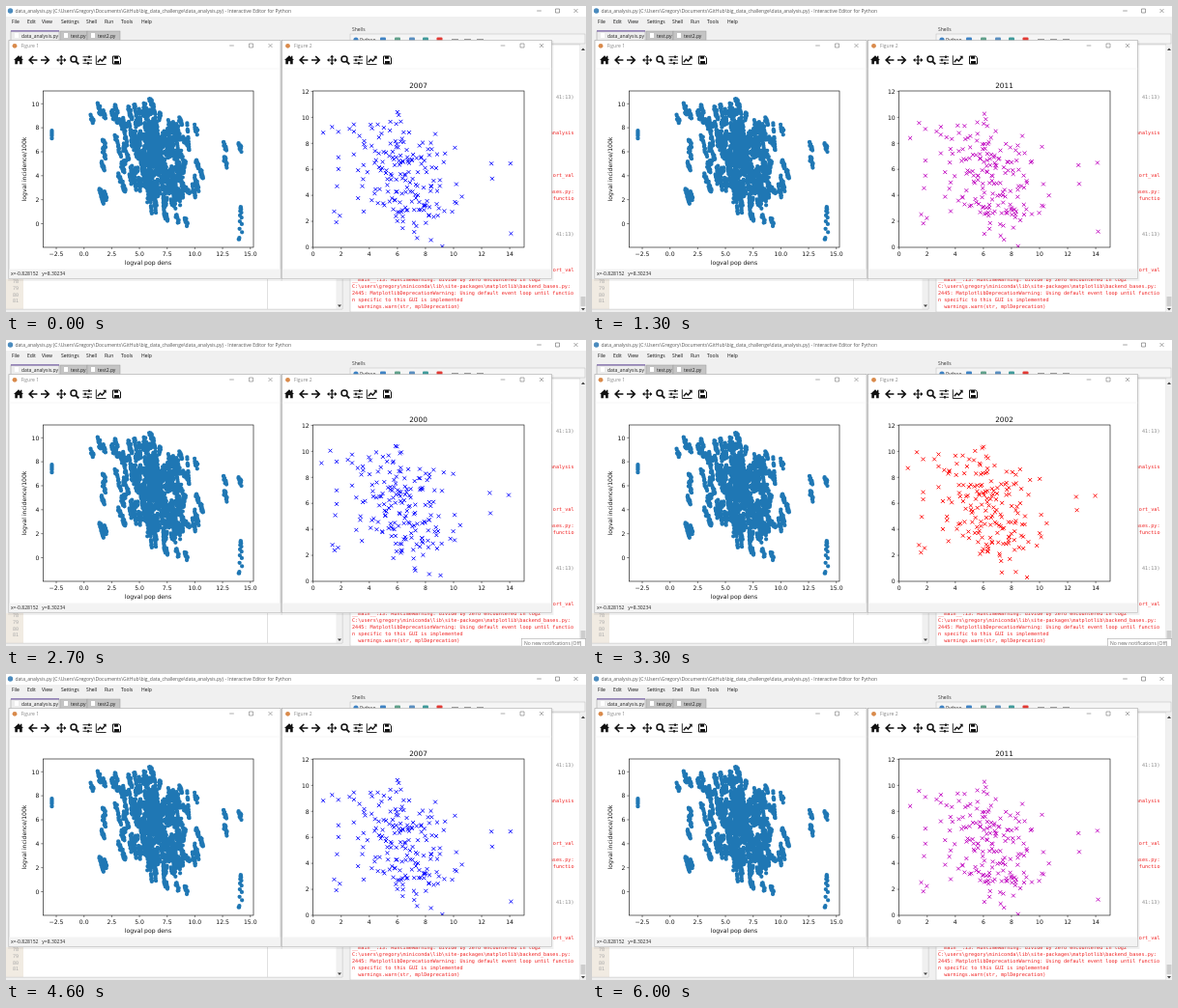
Animation of 600x317 px, one loop 6.1 s. Source, as an HTML page:

```html
<!DOCTYPE html>
<html lang="en">
<head>
<meta charset="utf-8">
<title>Yearly scatter</title>
<style>
  html, body { margin: 0; width: 100%; height: 100%; overflow: hidden; background: #f0f0f0; }
  svg { display: block; width: 600px; height: 317px; }
  text { white-space: pre; }
  .ui { font-family: "Open Sans", sans-serif; }
  .plot { font-family: "DejaVu Sans", sans-serif; }
  .mono { font-family: "DejaVu Sans Mono", monospace; }
</style>
</head>
<body>
<svg id="stage" viewBox="0 0 600 317" xmlns="http://www.w3.org/2000/svg"></svg>
<script>
const LOOP = 6100, YEAR_MS = 284, LEAD = 5, LAST_STEP = 20;
const FIRST_YEAR = 2000, YEARS = 16, START_YEAR = 7;
const COLORS = ['#0000ff', '#008000', '#ff0000', '#00bfbf', '#bf00bf', '#bfbf00', '#000000'];

// --- drawing helpers -------------------------------------------------
const rect = (x, y, w, h, fill, extra = '') =>
  `<rect x="${x}" y="${y}" width="${w}" height="${h}" fill="${fill}" ${extra}/>`;
const line = (d, stroke = '#000', width = 0.5, extra = '') =>
  `<path d="${d}" fill="none" stroke="${stroke}" stroke-width="${width}" ${extra}/>`;
const shape = (d, fill = '#111') => `<path d="${d}" fill="${fill}"/>`;
const text = (kind, x, y, str, size, fill = '#000', extra = '') =>
  `<text class="${kind}" x="${x}" y="${y}" font-size="${size}" fill="${fill}" ${extra}>${str}</text>`;
const END = 'text-anchor="end"', MID = 'text-anchor="middle"';
const range = (from, to, step) =>
  Array.from({ length: Math.round((to - from) / step) + 1 }, (_, i) => from + i * step);

// --- data: every country drifts a little each year -------------------
let seed = 20071;
function random() {
  seed = (seed + 0x6D2B79F5) | 0;
  let t = Math.imul(seed ^ (seed >>> 15), 1 | seed);
  t = (t + Math.imul(t ^ (t >>> 7), 61 | t)) ^ t;
  return ((t ^ (t >>> 14)) >>> 0) / 4294967296;
}
const normal = () => (random() + random() + random() + random() - 2) * 1.73;

const edge = [
  [.72, 8.75], [1.35, 9.6], [1.8, 9.2], [1.8, 6.8], [1.8, 5.9], [1.7, 4.8], [1.5, 2.6],
  [1.65, 2.1], [1.9, 2.4], [2.6, 9.1], [2.9, 9.5], [2.9, 8.8], [3.3, 8.4], [2.9, 7.1],
  [3.2, 6], [3.5, 4.6], [3.2, 3.8], [3.6, 3], [4.1, 9.5], [4.2, 9], [5.5, 9.8],
  [6, 10.3], [6.1, 10.1], [8.7, 8.6], [10.1, 7.8], [9.3, 6.7], [10.2, 5], [10.6, 4.1],
  [10.1, 3.5], [10.2, 3.1], [9.9, 2.7], [9.2, .2], [8.4, .5], [7.4, .6],
  [12.7, 6.5], [12.75, 5.2], [14.05, 6.45], [-2.9, 7.5]
];

function makeCountry(x, y, calm) {
  const drift = calm ? -0.035 : -0.04 + 0.05 * normal();
  const growth = calm ? 0.018 : 0.005 + 0.025 * random();
  return Array.from({ length: YEARS }, (_, i) => {
    const dt = i - START_YEAR;
    return [x + (x < 0 ? 0 : growth * dt), Math.min(10.4, y + drift * dt + 0.14 * normal())];
  });
}

const countries = edge.map(([x, y]) => makeCountry(x, y, true));
while (countries.length < 195) {
  const x = 6.5 + 1.5 * normal();
  const y = 5.7 - 0.25 * (x - 6.5) + 2.3 * normal();
  const top = 9.6 - Math.max(0, x - 6.5) * 0.5;
  const bottom = Math.max(1, 4.6 - x * 0.5);
  if (x > 3.4 && x < 9.4 && y > bottom && y < top) countries.push(makeCountry(x, y, false));
}
countries.push(Array.from({ length: YEARS }, (_, i) =>
  [13.95 + 0.02 * i, Math.max(-1.3, 1.4 - 0.065 * (i - 9.3) ** 2)]));

// --- axes ------------------------------------------------------------
const left = {
  x: v => 80.7 + v * 11.47, y: v => 225.5 - v * 12.42, box: [38.3, 88, 217.7, 162],
  xTicks: range(-2.5, 15, 2.5), yTicks: range(0, 10, 2), label: v => v.toFixed(1)
};
const right = {
  x: v => 317.7 + v * 14.53, y: v => 250 - v * 13.47, box: [317.7, 88, 218.3, 162],
  xTicks: range(0, 14, 2), yTicks: range(0, 12, 2), label: v => v
};
function axes(a) {
  const [x, y, w, h] = a.box, base = y + h;
  return rect(x, y, w, h, 'none', 'stroke="#000" stroke-width=".6"') +
    a.xTicks.map(v => line(`M${a.x(v)} ${base}v2.1`) +
      text('plot', a.x(v), base + 8.6, String(a.label(v)).replace('-', '−'), 6.1, '#111', MID)).join('') +
    a.yTicks.map(v => line(`M${x} ${a.y(v)}h-2.1`) +
      text('plot', x - 4, a.y(v) + 2.3, v, 6.1, '#111', END)).join('');
}
const at = (a, [x, y]) => `M${a.x(x).toFixed(2)} ${a.y(y).toFixed(2)}`;
const dots = countries.flat().map(p => at(left, p) + 'h0').join('');
const crosses = range(0, YEARS - 1, 1).map(i => countries.map(c =>
  at(right, c[i]) + 'm-1.9 -1.9l3.8 3.8m0 -3.8l-3.8 3.8').join(''));

// --- windows ---------------------------------------------------------
const buttons = (x, y, gap, color) =>
  line(`M${x - 2.3} ${y}h4.6M${x + gap - 2} ${y - 2}h4v4h-4zM${x + 2 * gap - 2} ${y - 2}l4 4m0 -4l-4 4`, color, 0.6);

function toolbar(x) {
  const icons = [
    shape('M8 56l5 -4.7 2 1.9v-1.5h1.4v2.8l1.6 1.5h-1.3v4.2h-2.6v-3h-2.2v3h-2.6v-4.2z'),
    line('M32.4 56h-8M28.2 52l-4 4 4 4', '#111', 1.7),
    line('M36 56h8M40.2 52l4 4 -4 4', '#111', 1.7),
    line('M53 56h8.4M57.2 51.8v8.4', '#111', 1.2),
    shape('M57.2 50.8l2 2.4h-4zM57.2 61.2l2 -2.4h-4zM52 56l2.4 -2v4zM62.4 56l-2.4 -2v4z'),
    '<circle cx="70" cy="55" r="3" fill="none" stroke="#111" stroke-width="1.5"/>',
    line('M72.3 57.3l3 3', '#111', 1.9),
    line('M79.5 52.7h9.5M79.5 56h9.5M79.5 59.3h9.5', '#111', 0.9),
    line('M86 51.4v2.6M82 54.7v2.6M85 58v2.6', '#111', 1.7),
    line('M93.3 51.3v9.2h10.2', '#111', 0.9),
    line('M94.8 58.2l2.6 -3 2 1.8 3.4 -4', '#111', 1.4),
    shape('M100.3 51.8h3.3v3.3z'),
    line('M110.5 52h6.3l1.7 1.7v6.3h-8z', '#111', 1),
    shape('M112 52h4v2.8h-4zM112 57h5v3h-5z')
  ];
  return `<g transform="translate(${x} 0)">${icons.join('')}</g>`;
}

function figureWindow(x, w, name, iconShift) {
  return rect(x - 1, 36, w + 3, 249, '#000', 'opacity=".06"') +
    rect(x, 35.5, w, 247, '#fff', 'stroke="#a9a9a9" stroke-width=".6"') +
    line(`M${x} 65h${w}`, '#eee') +
    rect(x + .3, 272.5, w - .6, 9.7, '#f3f3f3') +
    `<circle cx="${x + 6}" cy="41.3" r="2.4" fill="#d98a4b"/>` +
    text('ui', x + 12.5, 43.2, name, 5, '#888') +
    buttons(x + w - 50.5, 41, 20, '#777') + toolbar(iconShift);
}

function editor() {
  const menus = [[6, 'File'], [22, 'Edit'], [37, 'View'], [57, 'Settings'], [83, 'Shell'],
    [102, 'Run'], [119, 'Tools'], [140, 'Help']];
  const tab = (x, w, label, fill) =>
    rect(x, 26, w, 12, fill, 'stroke="#999" stroke-width=".5"') + rect(x + 4, 28, 4, 5, '#fff') +
    text('ui', x + 11, 32.6, label, 5, '#222');
  return rect(0, 0, 600, 317, '#f0f0f0') + rect(0, 0, 600, 11, '#fff') +
    '<circle cx="4.5" cy="5" r="2.7" fill="#4b8bbe"/>' +
    text('ui', 9.5, 7.1, 'data_analysis.py (C:\\Users\\Gregory\\Documents\\GitHub\\big_data_challenge\\data_analysis.py) - Interactive Editor for Python', 5.03, '#555') +
    buttons(551.5, 5, 19, '#666') +
    menus.map(([x, s]) => text('ui', x, 17.7, s, 5, '#111')).join('') +
    tab(56, 28, 'test.py', '#c4c4c4') + tab(84, 34, 'test2.py', '#c4c4c4') +
    tab(5, 50, 'data_analysis.py', '#ededed') + rect(5, 25.3, 50, 1.2, '#7861a8') +
    rect(0, 283, 348, 31, '#fff') + rect(0, 283, 18, 31, '#f1ebe2') +
    ['78', '79', '80', '81'].map((n, i) => text('mono', 7, 287 + i * 6.8, n, 5, '#aaa')).join('') +
    line('M270.5 283v31', '#ccc', 0.6) +
    rect(341.5, 283, 6.5, 31, '#f0f0f0') + shape('M343 309.5h4l-2 2.4z', '#444') +
    line('M0 314.2h348M348.2 283v31', '#bbb');
}

function shell() {
  const tail = [
    '__main__:13: RuntimeWarning: divide by zero encountered in log2',
    'C:\\users\\gregory\\miniconda\\lib\\site-packages\\matplotlib\\backend_bases.py:',
    '2445: MatplotlibDeprecationWarning: Using default event loop until functio',
    'n specific to this GUI is implemented',
    '  warnings.warn(str, mplDeprecation)'
  ];
  const ends = [[95.5, '41:13)', '#888'], [133, 'analysis'], [176.5, 'ort_val'], [193.8, 'bases.py:'],
    [200.8, 'functio'], [237.5, '41:13)', '#888'], [274.5, 'ort_val']];
  const tools = [[390, '#3f83c4'], [405, '#5fa08a'], [420, '#5a8fc0'], [434, '#3f9a9a'], [448.5, '#e23b35']];
  return text('ui', 358, 26.3, 'Shells', 5, '#333') +
    rect(356, 29, 243, 10, '#f5f5f5', 'stroke="#bbb" stroke-width=".5"') +
    '<circle cx="362" cy="35" r="2.6" fill="#3f83c4"/>' + text('ui', 366, 37, 'Python', 5, '#333') +
    tools.map(([x, c]) => rect(x - 3, 32.5, 6, 6, c, 'rx="1"')).join('') +
    line('M461 34.5h7m6 0h7m6 0h7', '#999', 1) +
    rect(356, 40, 238, 277, '#fff', 'stroke="#bbb" stroke-width=".5"') +
    ends.map(([y, s, c = '#f02020']) => text('mono', 587.5, y, s, 5.15, c, END)).join('') +
    tail.map((s, i) => text('mono', 358, 285.4 + i * 6.95, s, 5.15, '#f02020')).join('') +
    rect(594, 40, 6, 277, '#f0f0f0') + rect(594.5, 301, 5, 10, '#cdcdcd') +
    shape('M595 46h4l-2 -2.4zM595 313h4l-2 2.4z', '#444');
}

const stage = document.getElementById('stage');
stage.innerHTML =
  '<clipPath id="area">' + rect(...right.box, '#fff') + '</clipPath>' +
  editor() + shell() +
  figureWindow(3, 281, 'Figure 1', 0) + figureWindow(285.5, 279, 'Figure 2', 280) +
  line(dots, '#1f77b4', 4.3, 'stroke-linecap="round"') + axes(left) +
  text('plot', 147, 267.7, 'logval pop dens', 6.1, '#111', MID) +
  text('plot', 0, 0, 'logval incidence/100k', 6.1, '#111', MID + ' transform="translate(21 169) rotate(-90)"') +
  text('ui', 5, 279.2, 'x=-0.828152   y=8.30234', 5, '#222') +
  '<g clip-path="url(#area)"><path id="marks" fill="none" stroke-width=".95"/></g>' + axes(right) +
  text('plot', 426.5, 85, '', 7.3, '#111', MID + ' id="year"') +
  '<g id="notice">' + rect(533.5, 309.5, 66.2, 8, '#fff', 'stroke="#aaa" stroke-width=".6"') +
  text('ui', 536, 315.6, 'No new notifications (Off)', 5, '#666') + '</g>';

const marks = document.getElementById('marks');
const year = document.getElementById('year');
const notice = document.getElementById('notice');
let shown = -1;

function render(t) {
  const step = Math.min(LAST_STEP, Math.floor((t + LEAD) / YEAR_MS));
  const index = (START_YEAR + step) % YEARS;
  if (index !== shown) {
    shown = index;
    year.textContent = FIRST_YEAR + index;
    marks.setAttribute('d', crosses[index]);
    marks.setAttribute('stroke', COLORS[index % COLORS.length]);
  }
  notice.setAttribute('visibility', t >= 2700 && t < 3700 ? 'visible' : 'hidden');
}

const begin = performance.now();
function tick() {
  render((performance.now() - begin) % LOOP);
  requestAnimationFrame(tick);
}
tick();
</script>
</body>
</html>
```
